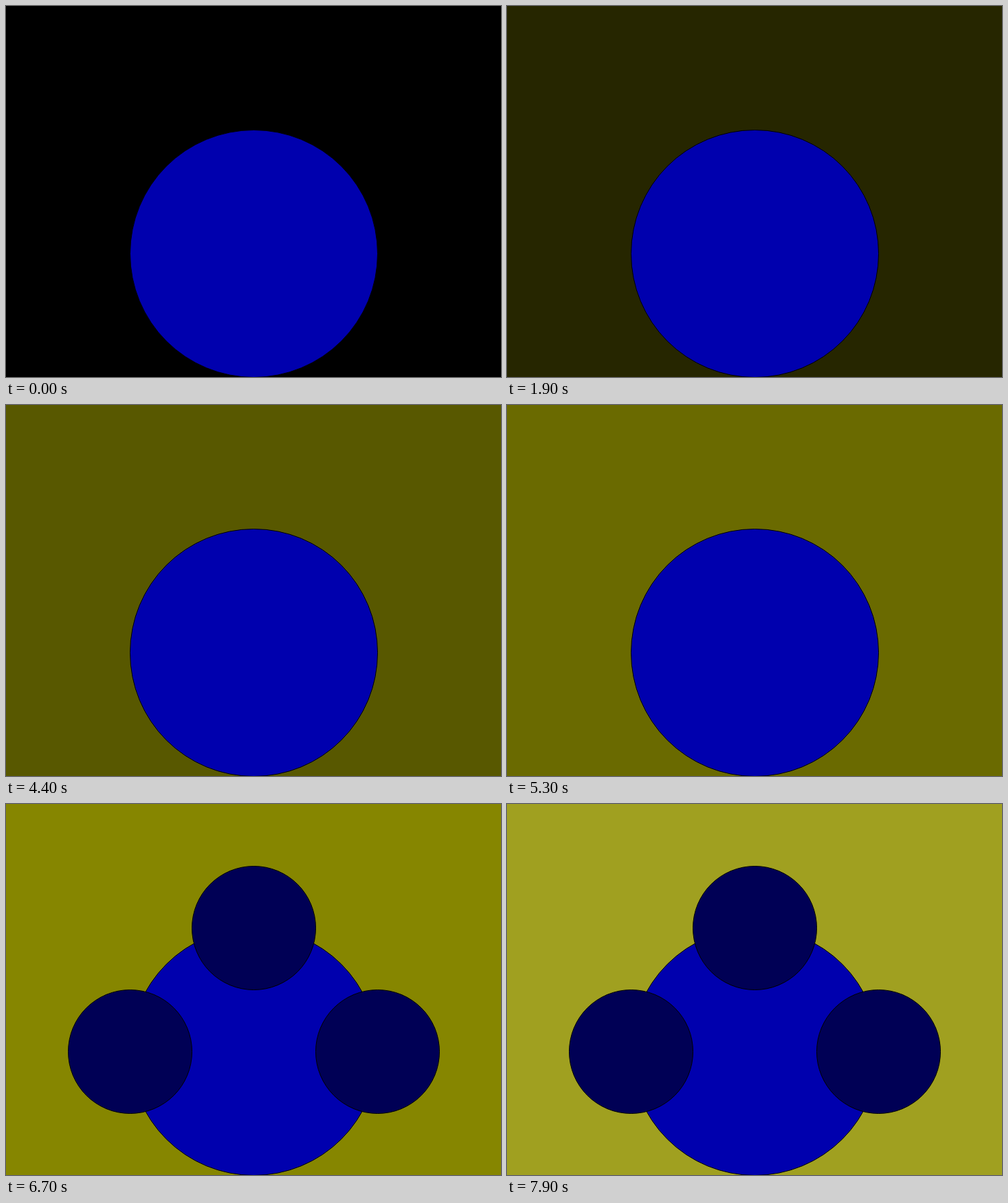
Animation of 720 by 540 pixels, one loop 8000 ms. Source, as an HTML page with a canvas:

```html
<!DOCTYPE html>
<html lang="en">
<head>
<meta charset="utf-8">
<title>Circles</title>
<style>
  html, body { margin: 0; width: 100%; height: 100%; overflow: hidden; background: #000; }
  canvas { display: block; width: 720px; height: 540px; }
</style>
</head>
<body>
<canvas id="stage" width="720" height="540"></canvas>
<script>
const ctx = document.getElementById('stage').getContext('2d');
const LOOP = 8000, STEP = 100;
const SMALL_FROM = 65, TINT_FROM = 78;
const start = performance.now();

function disc(x, y, r, fill) {
  ctx.beginPath();
  ctx.arc(x + 0.5, y + 0.5, r, 0, Math.PI * 2);
  ctx.fillStyle = fill;
  ctx.fill();
  ctx.stroke();
}

function draw(n) {
  // The backdrop brightens by two levels per step, then turns paler.
  const pale = n >= TINT_FROM;
  const level = pale ? 160 : n * 2;
  ctx.fillStyle = `rgb(${level}, ${level}, ${pale ? 32 : 0})`;
  ctx.fillRect(0, 0, 720, 540);

  ctx.strokeStyle = '#000';
  ctx.lineWidth = 1;
  disc(360, 360, 180, '#0000ae');
  if (n >= SMALL_FROM) {
    for (const [x, y] of [[360, 180], [180, 360], [540, 360]]) {
      disc(x, y, 90, '#000055');
    }
  }
}

function tick() {
  const t = (performance.now() - start) % LOOP;
  draw(Math.floor(t / STEP));
  requestAnimationFrame(tick);
}
tick();
</script>
</body>
</html>
```
